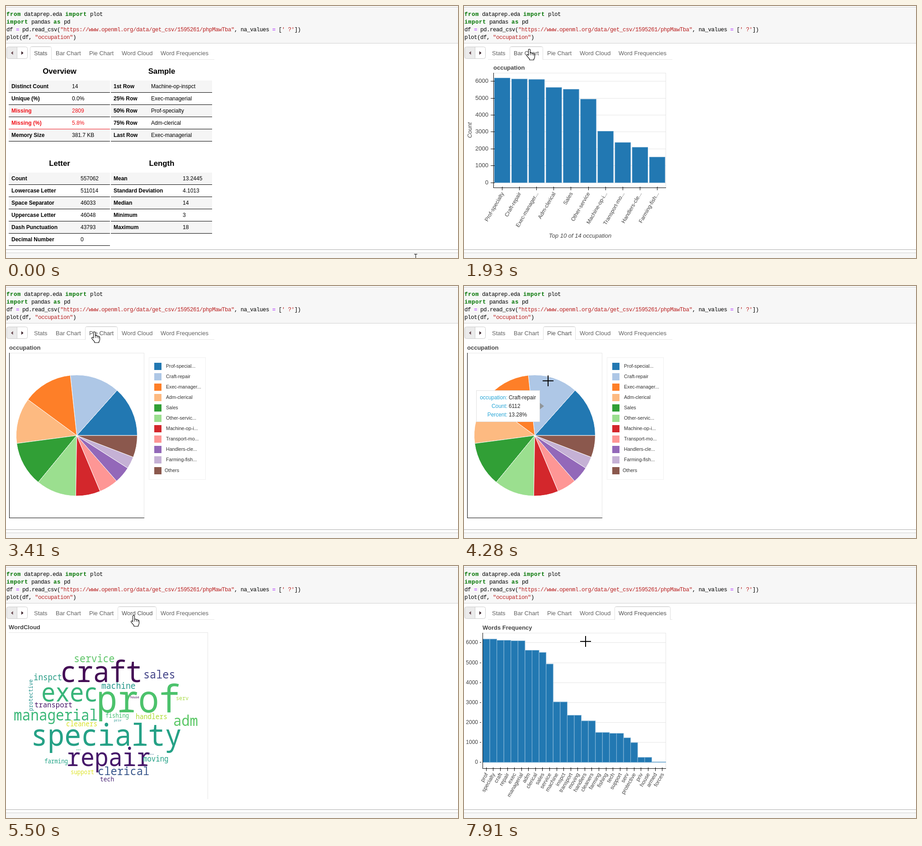
Write an HTML page with a canvas that moves like this. It is 1000 px wide and 558 px high and loops after 8000 ms.

```html
<!DOCTYPE html>
<html lang="en">
<head>
<meta charset="utf-8">
<title>Column overview</title>
<style>
html, body { margin: 0; width: 100%; height: 100%; overflow: hidden; background: #fff; }
canvas { display: block; }
</style>
</head>
<body>
<canvas id="stage" width="1000" height="558"></canvas>
<script>
const ctx = document.getElementById('stage').getContext('2d');
const LOOP = 8000;
const SANS = '"Liberation Sans", Arial, sans-serif';
const CODE = '"Liberation Mono", monospace';
const CLOUD = '"Noto Sans Mono", "DejaVu Sans Mono", monospace';
const BLUE = '#2278b2', GRID = '#e5e5e5', INK = '#444';

function rect(x, y, w, h, color) {
  ctx.fillStyle = color;
  ctx.fillRect(x, y, w, h);
}

function frame(x, y, w, h, color) {
  ctx.strokeStyle = color;
  ctx.lineWidth = 1;
  ctx.strokeRect(x + 0.5, y + 0.5, w - 1, h - 1);
}

function text(str, x, y, size, color = INK, style = '', align = 'left') {
  ctx.font = `${style} ${size}px ${SANS}`;
  ctx.fillStyle = color;
  ctx.textAlign = align;
  ctx.fillText(str, x, y);
}

function turned(str, x, y, angle, size, style, align) {
  ctx.save();
  ctx.translate(x, y);
  ctx.rotate(angle);
  text(str, 0, size * 0.35, size, INK, style, align);
  ctx.restore();
}

function fillPath(points, color) {
  ctx.beginPath();
  points.forEach(([x, y]) => ctx.lineTo(x, y));
  ctx.closePath();
  ctx.fillStyle = color;
  ctx.fill();
}

// ---- notebook cell ----
const TOKEN = { k: '#007400', s: '#ba2121', o: '#aa22ff', n: '#000' };
const SOURCE = [
  [['k', 'from'], ['n', ' dataprep.eda '], ['k', 'import'], ['n', ' plot']],
  [['k', 'import'], ['n', ' pandas '], ['k', 'as'], ['n', ' pd']],
  [['n', 'df '], ['o', '='], ['n', ' pd.read_csv('],
   ['s', '"https://www.openml.org/data/get_csv/1595261/phpMawTba"'],
   ['n', ', na_values '], ['o', '='], ['n', ' ['], ['s', "' ?'"], ['n', '])']],
  [['n', 'plot(df, '], ['s', '"occupation"'], ['n', ')']],
];

function drawCode() {
  ctx.textAlign = 'left';
  SOURCE.forEach((line, row) => {
    let x = 1;
    for (const [kind, str] of line) {
      const advance = kind === 'k' ? 8 : 7;
      ctx.font = `${kind === 'k' ? 'bold ' : ''}12.5px ${CODE}`;
      ctx.letterSpacing = '0px';
      ctx.letterSpacing = `${advance - ctx.measureText('m').width}px`;
      ctx.fillStyle = TOKEN[kind];
      ctx.fillText(str, x, 22 + row * 17);
      x += str.length * advance;
    }
  });
  ctx.letterSpacing = '0px';
}

function drawPage() {
  rect(0, 0, 1000, 558, '#fff');
  rect(0, 2, 1000, 81, '#f7f7f7');
  rect(0, 2, 1000, 1, '#cfcfcf');
  rect(0, 82, 1000, 1, '#cfcfcf');
  rect(0, 539, 1000, 1, '#ababab');
  rect(0, 546, 1000, 12, '#f7f7f7');
  rect(0, 546, 1000, 1, '#cfcfcf');
  drawCode();
}

// ---- tabs ----
const TABS = ['Stats', 'Bar Chart', 'Pie Chart', 'Word Cloud', 'Word Frequencies'];
const EDGES = [53, 101, 175, 247, 333, 457];

const tabAt = (x, y) => y >= 90 && y < 118
  ? TABS.findIndex((_, i) => x >= EDGES[i] && x < EDGES[i + 1]) : -1;

function drawTabs(active, hover) {
  ctx.beginPath();
  ctx.roundRect(1.5, 90.5, 46, 26, 4);
  ctx.fillStyle = '#fff';
  ctx.fill();
  rect(2, 91, 22, 25, '#ebebeb');
  ctx.strokeStyle = '#ccc';
  ctx.lineWidth = 1;
  ctx.stroke();
  rect(24, 91, 1, 25, '#ccc');
  fillPath([[15.5, 100], [15.5, 108], [11, 104]], '#6b4a52');
  fillPath([[34, 100], [34, 108], [38.5, 104]], '#3a2028');

  rect(53, 118, 408, 1, '#e6e6e6');
  TABS.forEach((name, i) => {
    const x = EDGES[i], w = EDGES[i + 1] - x;
    if (i === hover && i !== active) rect(x, 90, w, 28, '#f1f1f1');
    if (i === active) {
      ctx.beginPath();
      ctx.roundRect(x + 0.5, 89.5, w - 1, 31, [4, 4, 0, 0]);
      ctx.strokeStyle = '#dcdcdc';
      ctx.stroke();
      rect(x + 2, 90, w - 4, 1, '#dcdcdc');
      rect(x + 1, 118, w - 2, 4, '#fff');
      rect(x, 119, w, 3, '#fff');
    }
    text(name, x + 9, 109, 13, i === active ? '#525252' : '#626262');
  });
}

// ---- stats ----
const TABLES = [
  ['Overview', 6, 165, 146, [['Distinct Count', '14'], ['Unique (%)', '0.0%'], ['Missing', '2809'],
    ['Missing (%)', '5.8%'], ['Memory Size', '381.7 KB']]],
  ['Sample', 232, 165, 321, [['1st Row', 'Machine-op-inspct'], ['25% Row', 'Exec-managerial'],
    ['50% Row', 'Prof-specialty'], ['75% Row', 'Adm-clerical'], ['Last Row', 'Exec-managerial']]],
  ['Letter', 6, 369, 165, [['Count', '557062'], ['Lowercase Letter', '511014'], ['Space Separator', '46033'],
    ['Uppercase Letter', '46048'], ['Dash Punctuation', '43793'], ['Decimal Number', '0']]],
  ['Length', 232, 369, 391, [['Mean', '13.2445'], ['Standard Deviation', '4.1013'], ['Median', '14'],
    ['Minimum', '3'], ['Maximum', '18']]],
];

function drawStats() {
  for (const [title, x, top, valueX, rows] of TABLES) {
    text(title, x + 112.5, top - 15, 16.8, '#000', 'bold', 'center');
    rows.forEach(([label, value], i) => {
      const y = top + i * 27;
      const color = label.startsWith('Missing') ? '#f01018' : '#000';
      if (i % 2 === 0) rect(x, y, 224, 26, '#f5f5f5');
      rect(x, y + 26, 224, 1, label === 'Missing (%)' ? '#f01018' : '#000');
      text(label, x + 6, y + 17, 12, color, 'bold');
      text(value, valueX, y + 17, 12, color);
    });
  }
}

// ---- bar charts ----
const JOBS = [['Prof-specialty', 6172], ['Craft-repair', 6112], ['Exec-manager...', 6086],
  ['Adm-clerical', 5611], ['Sales', 5504], ['Other-service', 4923], ['Machine-op-i...', 3022],
  ['Transport-mo...', 2355], ['Handlers-cle...', 2072], ['Farming-fish...', 1490]];
const WORDS = [['prof specialty', 6172], ['craft repair', 6112], ['exec managerial', 6086],
  ['adm clerical', 5611], ['sales', 5504], ['service', 4923], ['machine inspct', 3022],
  ['transport moving', 2355], ['handlers cleaners', 2072], ['farming fishing', 1490],
  ['tech support', 1446], ['serv', 1225], ['protective', 983], ['priv house', 242],
  ['armed forces', 15]].flatMap(([names, n]) => names.split(' ').map(name => [name, n]));

function drawBars(data, o) {
  const right = 446, pitch = (right - o.left) / data.length;
  const xOf = i => o.left + 0.5 + (i + 0.5) * pitch;
  const yOf = v => o.zero - v * o.unit;
  text(o.title, o.left, 141, 13, INK, 'bold');
  frame(o.left, 148, right - o.left + 1, o.bottom - 147, GRID);
  for (let v = 0; v <= 6000; v += 1000) {
    const y = Math.round(yOf(v));
    rect(o.left, y, right - o.left, 1, GRID);
    text(v, o.labelX, y + 4, o.labelSize, INK, '', 'right');
  }
  data.forEach(([, v], i) => {
    const x = xOf(i) - o.width / 2, y = yOf(v);
    rect(x, y, o.width, o.zero + 0.5 - y, BLUE);
    ctx.strokeStyle = o.edge;
    ctx.lineWidth = 1;
    ctx.strokeRect(x, y, o.width, o.zero + 0.5 - y);
  });
  rect(o.left, 148, 1, o.bottom - 147, '#000');
  rect(o.left, o.bottom, right - o.left + 1, 1, '#000');
  for (let v = 0; v <= 6000; v += 1000) rect(o.left - 6, Math.round(yOf(v)), o.tick, 1, '#000');
  data.forEach(([name], i) => {
    const x = xOf(i);
    rect(Math.floor(x), o.bottom - 2, 1, 8, '#000');
    turned(name, x + 0.5, o.bottom + 11, -Math.PI / 3, 12, '', 'right');
  });
}

function drawBarChart() {
  drawBars(JOBS, { title: 'occupation', left: 65, bottom: 402, zero: 390.5, unit: 0.0374,
    width: 34.3, edge: '#4a90c2', labelX: 54, labelSize: 13, tick: 9 });
  turned('Count', 12.5, 275, -Math.PI / 2, 13, 'italic', 'center');
  text('Top 10 of 14 occupation', 257, 513, 13, INK, 'italic', 'center');
}

function drawFrequencies() {
  drawBars(WORDS, { title: 'Words Frequency', left: 41, bottom: 448, zero: 434.4, unit: 0.04417,
    width: 405 / 26, edge: '#8fbcdb', labelX: 31, labelSize: 12, tick: 3 });
}

// ---- pie ----
const PIE = { x: 156.5, y: 331, r: 134 };
const SLICES = [...JOBS, ['Others', 2686]];
const TOTAL = SLICES.reduce((sum, [, n]) => sum + n, 0);
const HUES = ['#2278b2', '#aec7e6', '#fe7f28', '#fdba81', '#319f36', '#9bdf8f',
  '#d3272c', '#fe9695', '#9368b9', '#c5b1d5', '#8b584d'];
const SHORT = { 'Prof-specialty': 'Prof-special...', 'Other-service': 'Other-servic...' };

function sliceAt(x, y) {
  const dx = x - PIE.x, dy = PIE.y - y;
  if (Math.hypot(dx, dy) > PIE.r) return -1;
  const share = ((Math.atan2(dy, dx) / (2 * Math.PI) + 1) % 1) * TOTAL;
  let sum = 0;
  return SLICES.findIndex(([, n]) => (sum += n) > share);
}

function drawPie(pointer) {
  text('occupation', 7, 141, 13, INK, 'bold');
  frame(7, 148, 299, 366, GRID);
  rect(7, 148, 1, 366, '#000');
  rect(7, 513, 299, 1, '#000');

  let from = 0;
  SLICES.forEach(([, n], i) => {
    const to = from - n / TOTAL * 2 * Math.PI;
    ctx.beginPath();
    ctx.moveTo(PIE.x, PIE.y);
    ctx.arc(PIE.x, PIE.y, PIE.r, from, to, true);
    ctx.closePath();
    ctx.fillStyle = HUES[i];
    ctx.fill();
    ctx.strokeStyle = '#fff';
    ctx.lineWidth = 1;
    ctx.stroke();
    from = to;
  });

  frame(316, 158, 126, 271, '#f0f0f0');
  SLICES.forEach(([name], i) => {
    const y = 170 + i * 23.05;
    rect(328, Math.round(y), 16, 16, HUES[i]);
    text(SHORT[name] || name, name === 'Others' ? 351 : 354, Math.round(y + 11), 10.67, '#333');
  });

  const hit = sliceAt(pointer.x, pointer.y);
  if (hit >= 0) drawTooltip(hit);
}

function drawTooltip(i) {
  const [name, n] = SLICES[i];
  const before = SLICES.slice(0, i).reduce((sum, s) => sum + s[1], 0);
  const mid = (before + n / 2) / TOTAL * 2 * Math.PI;
  const x = Math.round(PIE.x + PIE.r / 2 * Math.cos(mid)) - 150;
  const y = Math.round(PIE.y - PIE.r / 2 * Math.sin(mid)) - 36;
  rect(x, y, 141, 70, '#fff');
  frame(x, y, 141, 70, '#e0e0e0');
  fillPath([[x + 141, y + 28], [x + 150, y + 35], [x + 141, y + 42]], '#909599');
  [['occupation:', name], ['Count:', n], ['Percent:', (n / TOTAL * 100).toFixed(2) + '%']]
    .forEach(([label, value], row) => {
      text(label, x + 69, y + 20 + row * 19, 11.9, '#26a5d6', '', 'right');
      text(value, x + 72, y + 20 + row * 19, 11.9, '#222');
    });
}

// ---- word cloud: word, left, baseline, size, colour ----
const CLOUD_WORDS = [
  ['service', 152, 213, 21.5, '#5ec568'], ['craft', 125, 257, 60.5, '#440c55'],
  ['inspct', 62, 253, 17.5, '#2a9d87'], ['sales', 306, 249, 23.5, '#414287'],
  ['exec', 81, 300, 52.5, '#39b57a'], ['machine', 211, 272, 18, '#25988a'],
  ['prof', 206, 324, 77, '#4cc26c'], ['serv', 377, 297, 11.7, '#a8db45'],
  ['house', 275, 293, 6.6, '#440154'], ['transport', 63, 313, 15.6, '#471669'],
  ['managerial', 18, 342, 31, '#3ab777'], ['fishing', 220, 336, 12.4, '#42be71'],
  ['handlers', 288, 339, 14.6, '#aedc34'], ['priv', 239, 344, 6.8, '#21918c'],
  ['adm', 372, 354, 30.5, '#5ac765'], ['cleaners', 134, 355, 14.4, '#d8e22a'],
  ['specialty', 61, 398, 61.8, '#25a186'], ['repair', 137, 443, 51.5, '#46186a'],
  ['clerical', 205, 463, 23.8, '#38568b'], ['moving', 303, 433, 15.7, '#22a085'],
  ['farming', 85, 437, 12.4, '#20a386'], ['support', 144, 461, 12.4, '#dde32a'],
  ['tech', 208, 477, 13, '#482475'], ['armed', 155, 408, 3.4, '#35b779'],
  ['forces', 316, 418, 3.2, '#31688e'],
];

function cloudWord(word, x, y, size, color, angle = 0) {
  ctx.save();
  ctx.translate(x, y);
  ctx.scale(1, angle ? 1 : 1.1);
  ctx.rotate(angle);
  ctx.font = `${size}px ${CLOUD}`;
  ctx.textAlign = 'left';
  ctx.fillStyle = color;
  ctx.fillText(word, ctx.measureText(word).actualBoundingBoxLeft, 0);
  ctx.restore();
}

function drawCloud() {
  text('WordCloud', 6, 140, 13, INK, 'bold');
  rect(6, 147, 441, 1, GRID);
  rect(446, 147, 1, 369, GRID);
  CLOUD_WORDS.forEach(w => cloudWord(...w));
  cloudWord('protective', 59, 321, 11.7, '#21918c', -Math.PI / 2);
}

// ---- pointer ----
const START = [906, 557];
// first step, last step, number of steps, path points after the previous place
const MOVES = [
  [70, 850, 11, [[860, 200], [420, -120], [161, 81]]],
  [930, 1000, 2, [[118, 93]]],
  [1070, 1150, 2, [[145, 95]]],
  [2940, 3260, 5, [[196, 101]]],
  [4120, 4280, 3, [[186, 210]]],
  [4350, 4430, 2, [[183, 245]]],
  [4810, 5280, 7, [[283, 109]]],
  [6590, 6900, 5, [[381, 106]]],
  [7450, 7740, 5, [[267, 167]]],
  [7910, 7910, 1, [[269, 167]]],
];
const VIEWS = [[0, drawStats], [1930, drawBarChart], [3410, drawPie], [5500, drawCloud], [7050, drawFrequencies]];
const CLICKS = [[1850, 1930], [3260, 3410], [5430, 5500], [6900, 7050]];
const HAND = new Path2D('M-2.5 14V2.5Q-2.5 .5 -.5 .5T1.5 2.5V9Q5 7.8 5.5 10Q8.5 9 9 11Q11.5 10.5 11.5 13V18Q11 21 9.5 22.5V24.5H0V22.5Q-3 19 -6 15.5Q-7 13 -5 12.5Q-3.5 12.8 -2.5 14Z');
const ARROW = new Path2D('M.5 .5V16.5L4 13 6.6 18.5 9 17.5 6.5 12H11.5Z');

function bezier(points, p) {
  while (points.length > 1) {
    points = points.slice(1).map((b, i) => b.map((v, k) => points[i][k] + (v - points[i][k]) * p));
  }
  return points[0];
}

function pointerAt(t) {
  let place = START;
  for (const [first, last, steps, path] of MOVES) {
    if (t < first) break;
    const gap = (last - first) / (steps - 1 || 1) || 1;
    const p = Math.min(1, (Math.floor((t - first) / gap + 0.05) + 1) / steps);
    const eased = steps > 3 ? p * p * (3 - 2 * p) : p;
    place = bezier([place, ...path], eased);
  }
  return { x: Math.round(place[0]), y: Math.round(place[1]) };
}

function drawPointer({ x, y }, view, pressed) {
  if (pressed) {
    ctx.beginPath();
    ctx.arc(x, y, 12, 0, 2 * Math.PI);
    ctx.fillStyle = 'rgba(252, 240, 20, 0.75)';
    ctx.fill();
  }
  const inPlot = view > 0 && y >= 148 && y < 514 && x > 7 && x < (view === 2 ? 306 : 447);
  if (inPlot) {
    rect(x - 12, y - 1, 24, 2, '#000');
    rect(x - 1, y - 12, 2, 24, '#000');
  } else if (y <= 82 || y >= 546) {
    rect(x, y - 8, 1, 17, '#000');
    for (const end of [y - 8, y + 8]) {
      rect(x - 3, end, 3, 1, '#000');
      rect(x + 1, end, 3, 1, '#000');
    }
  } else {
    const shape = tabAt(x, y) >= 0 ? HAND : ARROW;
    ctx.save();
    ctx.translate(x, y);
    ctx.fillStyle = '#fff';
    ctx.fill(shape);
    ctx.strokeStyle = '#111';
    ctx.lineWidth = 1.2;
    ctx.stroke(shape);
    if (shape === HAND) {
      rect(1, 9, 1, 5, '#111');
      rect(5, 10, 1, 4, '#111');
      rect(8.5, 11, 1, 4, '#111');
    }
    ctx.restore();
  }
}

function draw() {
  const t = performance.now() % LOOP;
  const pointer = pointerAt(t);
  const view = VIEWS.findLastIndex(([start]) => t >= start);
  drawPage();
  drawTabs(view, tabAt(pointer.x, pointer.y));
  VIEWS[view][1](pointer);
  drawPointer(pointer, view, CLICKS.some(([a, b]) => t >= a && t < b));
  requestAnimationFrame(draw);
}
draw();
</script>
</body>
</html>
```
